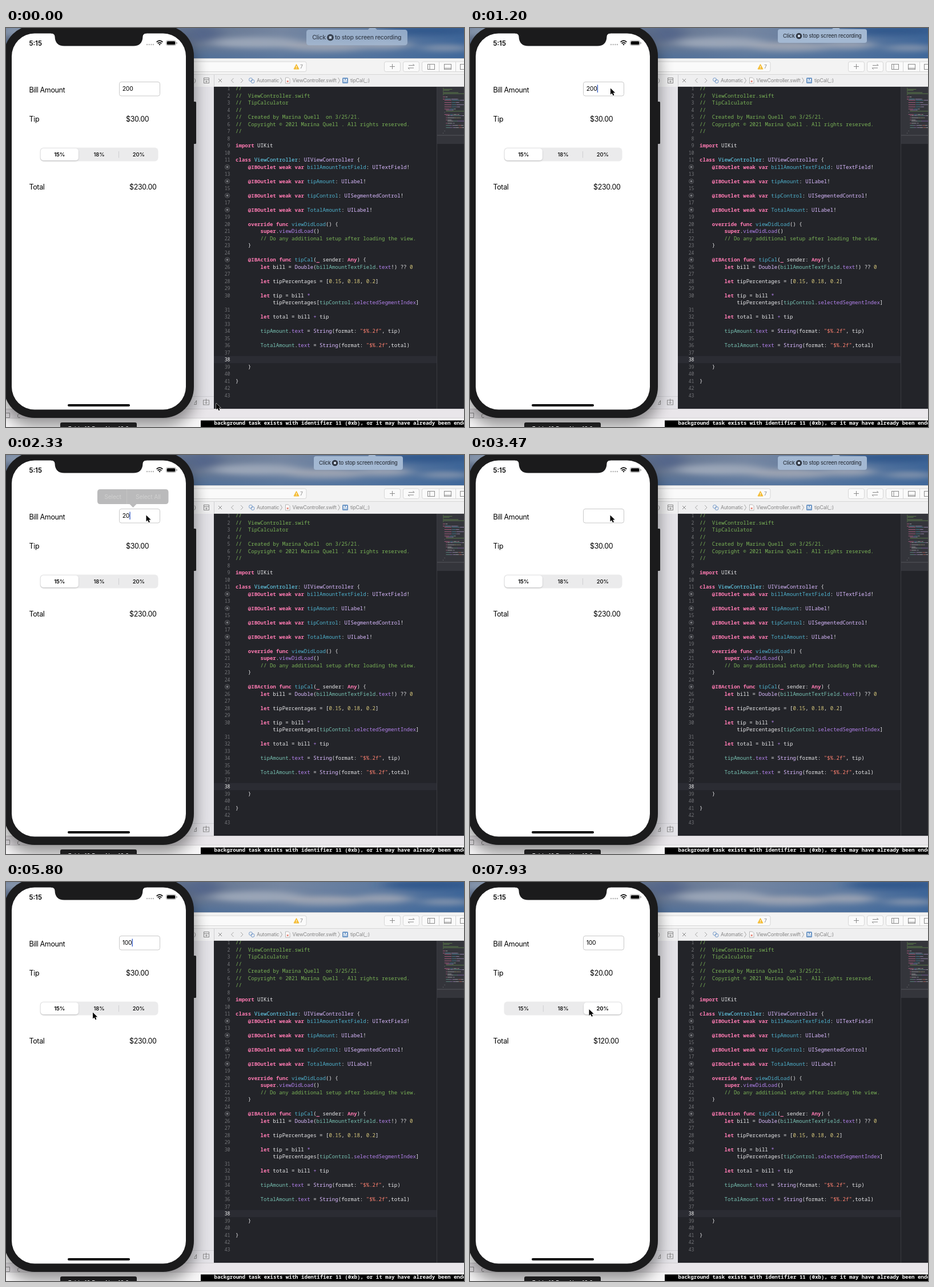
Recreate the animation shown at these times as an HTML page. Size 802 px wide and 699 px high, loop 8 s.

```html
<!DOCTYPE html>
<html lang="en">
<head>
<meta charset="utf-8">
<title>Tip calculator demo</title>
<style>
html, body { margin: 0; width: 100%; height: 100%; overflow: hidden; background: #fff; }
svg { display: block; width: 802px; height: 699px; }
text { white-space: pre; font-family: Inter, "Liberation Sans", sans-serif; }
.mono { font-family: "Noto Sans Mono", "DejaVu Sans Mono", monospace; font-size: 9.08px; font-weight: 500; }
.label { font-size: 12.4px; letter-spacing: -.3px; }
.small { font-size: 10.4px; letter-spacing: -.2px; }
.seg { font-size: 9.5px; text-anchor: middle; letter-spacing: -.1px; }
.crumb { font-size: 8.6px; letter-spacing: -.2px; fill: #858585; }
.pop { font-size: 9.2px; letter-spacing: -.2px; fill: #2f3641; font-weight: 500; }
.line { fill: none; stroke: #8a8a8a; stroke-width: 1; }
</style>
</head>
<body>
<svg viewBox="0 0 802 699">
  <defs>
    <linearGradient id="sky">
      <stop offset=".4" stop-color="#64748f"/><stop offset=".6" stop-color="#7586a1"/>
      <stop offset=".8" stop-color="#5f7a9f"/><stop offset="1" stop-color="#3d6598"/>
    </linearGradient>
    <linearGradient id="haze" x2="0" y2="1">
      <stop offset=".55" stop-color="#416a9c" stop-opacity="0"/><stop offset="1" stop-color="#416a9c" stop-opacity=".6"/>
    </linearGradient>
    <filter id="soft" x="-50%" y="-80%" width="200%" height="260%"><feGaussianBlur stdDeviation="14 5"/></filter>
    <filter id="shade" x="-20%" y="-20%" width="140%" height="140%"><feGaussianBlur stdDeviation="13"/></filter>
    <filter id="lift" x="-20%" y="-30%" width="140%" height="180%"><feDropShadow dx="0" dy="1" stdDeviation="1.2" flood-opacity=".22"/></filter>
    <clipPath id="skyClip"><rect width="802" height="54"/></clipPath>
    <clipPath id="editorClip"><rect x="364" y="103" width="438" height="564"/></clipPath>
  </defs>

  <!-- wallpaper -->
  <g clip-path="url(#skyClip)">
    <rect width="802" height="54" fill="url(#sky)"/>
    <g id="clouds" filter="url(#soft)"></g>
    <rect width="802" height="54" fill="url(#haze)"/>
  </g>

  <!-- editor window -->
  <rect y="53.5" width="802" height="146" fill="#f3f3f3"/>
  <path d="M0 53.5H802" stroke="#c9ccd1"/>
  <rect x="300" y="59" width="226" height="17.5" rx="3" fill="#fafafa" stroke="#d6d6d6"/>
  <path d="M508.500 63.500L513 72H504Z" fill="#f5bd37" stroke="#f5bd37" stroke-linejoin="round"/>
  <path d="M508.500 66.500V69.200M508.500 70.200V71.200" stroke="#fff"/>
  <text class="crumb" x="515" y="71">7</text>
  <g fill="#fafafa" stroke="#d6d6d6">
    <rect x="662.500" y="59" width="28" height="17.500" rx="3"/>
    <rect x="695.500" y="59" width="28" height="17.500" rx="3"/>
    <rect x="728.500" y="59" width="90" height="17.500" rx="3"/>
    <path d="M758.500 59V76.500M787.500 59V76.500"/>
  </g>
  <g class="line">
    <path d="M672 67.500H681M676.500 63V72"/>
    <path d="M705 65.500H715L712.500 63M714 70H704L706.500 72.500"/>
    <rect x="738.500" y="63.500" width="12" height="9"/><path d="M742 63.500V72.500"/>
    <rect x="767.500" y="63.500" width="12" height="9"/><path d="M767.500 70.500H779.500"/>
    <rect x="795.500" y="63.500" width="12" height="9"/>
  </g>
  <rect y="81" width="802" height="22" fill="#efeff0"/>
  <path d="M0 81.500H802M364 102.500H802" stroke="#d6d6d7"/>
  <rect x="300" y="103" width="64" height="564" fill="#e3e2e7"/>
  <path d="M300 645.500H364" stroke="#cfcfd4"/>
  <path d="M364.500 82V103" stroke="#cfcfd2"/>
  <g class="line">
    <path d="M330 88.500Q333.500 92 330 96.500"/>
    <rect x="346.500" y="87.500" width="9" height="9"/><path d="M346.500 90.500H355.500M351 92V95.500M349.200 93.700H352.800"/>
    <path d="M329 659.500H333.500V652.500L330 658"/>
    <rect x="345.500" y="652" width="10" height="8"/><path d="M350.500 649.500V658M348 655.500L350.500 658L353 655.500"/>
    <path d="M372 89L378 95M378 89L372 95"/>
    <path d="M398.500 88L394.500 92L398.500 96M411 88L415 92L411 96" stroke="#a5a5a5"/>
    <path d="M480.500 87L483.500 92L480.500 97M581.500 87L584.500 92L581.500 97" stroke="#a5a5a5"/>
    <g stroke="#6f97c9"><circle cx="428.500" cy="90.500" r="3"/><circle cx="432" cy="93.500" r="3"/></g>
    <path d="M489.500 87H494.500L497 89.500V97H489.500Z" stroke="#b5b5b5" fill="#fff"/>
  </g>
  <rect x="491.700" y="92" width="3" height="3" fill="#e58a7d"/>
  <rect x="589" y="87" width="10" height="10" rx="1.500" fill="#6c96c6"/>
  <text x="594" y="95" font-size="7.5" font-weight="700" fill="#fff" text-anchor="middle">M</text>
  <text class="crumb" x="439" y="95">Automatic</text>
  <text class="crumb" x="501.500" y="95">ViewController.swift</text>
  <text class="crumb" x="603" y="95">tipCal(_:)</text>

  <g clip-path="url(#editorClip)">
    <rect x="364" y="103" width="438" height="564" fill="#232429"/>
    <rect x="364" y="574.700" width="390" height="12.500" fill="#2b2c33"/>
    <path d="M754.500 103V667" stroke="#393a40"/>
    <rect x="755" y="103" width="47" height="100" fill="#34353b"/>
    <path d="M755 188H802" stroke="#55565d"/>
    <g id="map" opacity=".6"></g>
    <g id="code"></g>
  </g>

  <rect y="667" width="802" height="32" fill="#e9e6ea"/>
  <path d="M0 667.500H802" stroke="#cfcdd0"/>
  <path d="M0 683.500H802" stroke="#d5d3d6"/>
  <rect y="684" width="802" height="15" fill="#f8f7f8"/>
  <rect x="341" y="687.500" width="461" height="11.500" fill="#000"/>
  <text class="mono" x="364.500" y="695" fill="#fff" style="font-weight:700">background task exists with identifier 11 (0xb), or it may have already been ended</text>
  <path class="line" d="M0 674.500H6.500V682.500H0M24.500 676Q20 676 20.500 680T24.500 682M45 682H53"/>

  <!-- phone -->
  <rect x="-6" y="12" width="337" height="686" rx="54" opacity=".4" filter="url(#shade)"/>
  <rect x="324" y="129" width="9" height="74" rx="1.500" fill="#1b1b1c"/>
  <rect x="-4" y="-5" width="333" height="688" rx="54" fill="#1b1b1c"/>
  <rect x="10" y="9.500" width="305" height="659" rx="40" fill="#fff"/>
  <path d="M79 6V9.500Q85 9.500 85.500 15Q86 31.500 102 31.500H223Q239 31.500 239.500 15Q240 9.500 246 9.500V6Z" fill="#1b1b1c"/>
  <text x="40.500" y="30.800" font-size="11.400" font-weight="600">5:15</text>
  <g fill="#b5b5b5">
    <circle cx="247" cy="29" r="1.200"/><circle cx="250.700" cy="29" r="1.200"/>
    <circle cx="254.400" cy="29" r="1.200"/><circle cx="258" cy="29" r="1.200"/>
  </g>
  <g fill="none" stroke="#000" stroke-width="1.700">
    <path d="M263.700 24.600Q269 19.800 274.300 24.600M265.700 27Q269 24.200 272.300 27"/>
  </g>
  <path d="M267.200 28.600Q269 27.200 270.800 28.600L269 30.600Z"/>
  <rect x="280.500" y="22" width="17" height="8.500" rx="2.500" fill="none" stroke="#999" stroke-width=".8"/>
  <rect x="281.700" y="23.200" width="14.600" height="6.100" rx="1.500"/>
  <rect x="298.500" y="24.800" width="1.200" height="3" rx=".6" fill="#888"/>

  <text class="label" x="40.500" y="113">Bill Amount</text>
  <text class="label" x="40.500" y="164">Tip</text>
  <text class="label" x="40.500" y="282.500">Total</text>
  <text class="label" id="tip" x="210" y="164"></text>
  <text class="label" id="total" x="216" y="282.500"></text>
  <rect x="198.500" y="94.500" width="71" height="24.500" rx="3.500" fill="#fff" stroke="#c9c9c9"/>
  <text class="small" id="bill" x="203.700" y="110.400"></text>
  <rect id="caret" y="99.500" width="1.400" height="13.500" fill="#3f63c8"/>

  <rect x="59.500" y="209.500" width="207" height="24" rx="6" fill="#ebebec"/>
  <path id="div0" d="M128.300 216V227.500" stroke="#cfcfd2"/>
  <path id="div1" d="M197.500 216V227.500" stroke="#cfcfd2"/>
  <rect id="thumb" x="60.800" y="211" width="66" height="21" rx="5" fill="#fff" filter="url(#lift)"/>
  <text class="seg" id="seg0" x="93.700" y="225">15%</text>
  <text class="seg" id="seg1" x="163" y="225">18%</text>
  <text class="seg" id="seg2" x="232.200" y="225">20%</text>
  <rect x="108" y="659" width="109" height="4" rx="2"/>

  <g id="menu">
    <path d="M165 60H279.500Q284.500 60 284.500 65V81Q284.500 86 279.500 86H228.500L222.500 92L216.500 86H165Q160 86 160 81V65Q160 60 165 60Z" fill="#1f1f20"/>
    <path d="M211.500 60V86" stroke="#555" stroke-width=".6"/>
    <g id="menuText" class="small" fill="#fff" text-anchor="middle">
      <text x="187" y="76.800">Select</text><text x="249" y="76.800">Select All</text>
    </g>
  </g>

  <rect x="95" y="691" width="134" height="14" rx="3" fill="#1d1d1e"/>
  <text x="162" y="705.500" font-size="10" font-weight="500" fill="#fff" text-anchor="middle">Fable 12 Duo Air – 13.3</text>

  <!-- recording hint -->
  <g id="hint">
    <path d="M634 2L641 -5L648 2Z" fill="#a3b8d2"/>
    <rect x="539" y="2" width="156" height="24" rx="4" fill="#a3b8d2"/>
    <text class="pop" x="548" y="17.200">Click</text>
    <circle cx="576" cy="14" r="5.200" fill="#2f3641"/>
    <rect x="574" y="12" width="4" height="4" fill="#c9d6e6"/>
    <text class="pop" x="583" y="17.200">to stop screen recording</text>
  </g>

  <path id="cursor" d="M0 0V11L2.600 8.700L4.500 12.800L6.400 12L4.600 8H8.200Z" stroke="#fff" stroke-width="1" paint-order="stroke" stroke-linejoin="round"/>
</svg>
<script>
const NS = "http://www.w3.org/2000/svg";
const $ = id => document.getElementById(id);

function add(parent, tag, attrs, text) {
  const node = document.createElementNS(NS, tag);
  for (const key in attrs) node.setAttribute(key, attrs[key]);
  if (text) node.textContent = text;
  parent.appendChild(node);
  return node;
}

// x, y, radius x, radius y, colour
[
  [440, 26, 80, 10, "#9aa5b7"], [560, 34, 70, 9, "#a0a6b3"], [660, 30, 50, 9, "#949fb1"],
  [770, 36, 45, 6, "#8c99ae"], [740, 5, 80, 8, "#31588c"], [345, 10, 30, 14, "#54668a"],
  [20, 6, 30, 10, "#8d9db3"]
].forEach(([cx, cy, rx, ry, fill]) => add($("clouds"), "ellipse", { cx, cy, rx, ry, fill }));

// "~x" switches to colour x
const COLORS = {
  c: "#7ab356", k: "#ff7ab2", w: "#e8e8ea", n: "#6bdfff", t: "#dabaff",
  d: "#4eb0cc", p: "#b281eb", v: "#78c2b3", y: "#d9c97c", s: "#ff8170"
};
const outlet = (name, type) => `    ~k@IBOutlet weak var ~d${name}~w: ~t${type}~w!`;
const CODE = [
  "~c//",
  "~c//  ViewController.swift",
  "~c//  TipCalculator",
  "~c//",
  "~c//  Created by Marina Quell  on 3/25/21.",
  "~c//  Copyright © 2021 Marina Quell . All rights reserved.",
  "~c//", "",
  "~kimport ~wUIKit", "",
  "~kclass ~nViewController~w: ~tUIViewController ~w{",
  outlet("billAmountTextField", "UITextField"), "",
  outlet("tipAmount", "UILabel"), "",
  outlet("tipControl", "UISegmentedControl"), "",
  outlet("TotalAmount", "UILabel"), "",
  "    ~koverride func ~dviewDidLoad~w() {",
  "        ~ksuper~w.~pviewDidLoad~w()",
  "        ~c// Do any additional setup after loading the view.",
  "    ~w}", "",
  "    ~k@IBAction func ~dtipCal~w(~k_ ~wsender: ~kAny~w) {",
  "        ~klet ~wbill = ~tDouble~w(~vbillAmountTextField~w.~ptext~w!) ?? ~y0", "",
  "        ~klet ~wtipPercentages = [~y0.15~w, ~y0.18~w, ~y0.2~w]", "",
  "        ~klet ~wtip = bill ~p*",
  "            ~wtipPercentages[~vtipControl~w.~pselectedSegmentIndex~w]", "",
  "        ~klet ~wtotal = bill ~p+ ~wtip", "",
  "        ~vtipAmount~w.~ptext ~w= ~tString~w(format: ~s\"$%.2f\"~w, tip)", "",
  "        ~vTotalAmount~w.~ptext ~w= ~tString~w(format: ~s\"$%.2f\"~w,total)", "",
  "",
  "    ~w}", "",
  "~w}", "", ""
];
const WRAPPED_ROW = 30, CURRENT_LINE = 38, OUTLET_LINES = [12, 14, 16, 18, 25];
const CHAR = 5.446;

CODE.forEach((source, row) => {
  const y = 106 + 12.5 * row;
  const line = row < WRAPPED_ROW ? row + 1 : row;
  if (OUTLET_LINES.includes(line)) {
    add($("code"), "circle", { cx: 387.5, cy: y, r: 4, fill: "none", stroke: "#67686d", "stroke-width": .9 });
    add($("code"), "circle", { cx: 387.5, cy: y, r: 2, fill: "#77787d" });
  } else if (row !== WRAPPED_ROW) {
    add($("code"), "text", {
      x: 392.5, y: y + 3, class: "mono", "text-anchor": "end",
      fill: line === CURRENT_LINE ? "#fff" : "#747579", style: "font-size:8.2px"
    }, String(line));
  }
  let col = 0;
  source.split("~").forEach((part, i) => {
    const body = i ? part.slice(1) : part;
    const fill = COLORS[part[0]];
    if (i && body) {
      add($("code"), "text", {
        x: 402 + col * CHAR, y: y + 3.1, class: "mono", fill,
        style: part[0] === "k" ? "font-weight:700" : ""
      }, body);
      add($("map"), "rect", { x: 765 + col * .68, y: 105 + row * 1.92, width: body.trim().length * .68, height: .9, fill });
    }
    col += body.length;
  });
});

const LOOP = 8000;
const clamp = v => Math.max(0, Math.min(1, v));
const ramp = (t, from, to) => clamp((t - from) / (to - from));
const ease = v => v * v * (3 - 2 * v);
const stepAt = (t, steps) => steps.filter(s => s[0] <= t).pop()[1];

const PATH = [
  [0, 368, 657.5], [70, 368, 657.5], [930, 246, 105.5], [1730, 246, 105.5], [1870, 245.5, 105.5],
  [5330, 245.5, 105.5], [5800, 152, 228.5], [6070, 160, 228], [6330, 172.5, 225.5],
  [7200, 172.5, 225.5], [7530, 208.5, 223], [LOOP, 208.5, 223]
];
const BILL = [[0, "200"], [2270, "20"], [2400, "2"], [2730, ""], [3870, "1"], [4070, "10"], [4270, "100"]];
const PICK_18 = 6400, PICK_20 = 7530;

function cursorAt(t) {
  const i = PATH.findIndex(p => p[0] > t);
  const [t0, x0, y0] = PATH[i - 1], [t1, x1, y1] = PATH[i];
  const k = ease(ramp(t, t0, t1));
  return [x0 + (x1 - x0) * k, y0 + (y1 - y0) * k];
}

// Blinking restarts with each edit.
function caretAt(t) {
  if (t < 1000) return 0;
  if (t < BILL[1][0]) return 1;
  const start = stepAt(t, BILL.map(b => [b[0], b[0]]));
  const phase = (t - start) % 1000;
  return phase < 800 ? 1 - ramp(phase, 570, 655) : ramp(phase, 930, 1000);
}

function draw(t) {
  const [cx, cy] = cursorAt(t);
  $("cursor").setAttribute("transform", `translate(${cx} ${cy})`);

  const bill = $("bill"), text = stepAt(t, BILL);
  if (bill.textContent !== text) bill.textContent = text;
  $("caret").setAttribute("x", 203.8 + (text ? bill.getComputedTextLength() : 0));
  $("caret").setAttribute("opacity", caretAt(t));

  $("tip").textContent = stepAt(t, [[0, "$30.00"], [PICK_18, "$18.00"], [PICK_20, "$20.00"]]);
  $("total").textContent = stepAt(t, [[0, "$230.00"], [PICK_18, "$118.00"], [PICK_20, "$120.00"]]);

  const first = ease(ramp(t, PICK_18, PICK_18 + 260));
  const second = ease(ramp(t, PICK_20, PICK_20 + 260));
  $("thumb").setAttribute("transform", `translate(${69.2 * (first + second)} 0)`);
  $("div0").setAttribute("opacity", second);
  $("div1").setAttribute("opacity", 1 - first);
  const picked = (t >= PICK_18) + (t >= PICK_20);
  for (let i = 0; i < 3; i++) $("seg" + i).setAttribute("font-weight", i === picked ? 600 : 500);

  const menu = ramp(t, 1730, 1900) * (1 - ramp(t, 2240, 2370));
  $("menu").setAttribute("opacity", menu);
  $("menuText").setAttribute("opacity", menu);

  const settle = ease(ramp(t, 0, 270));
  const scale = 1.134 - .134 * settle;
  $("hint").setAttribute("transform", `translate(636 -5.5) scale(${scale}) translate(-636 5.5)`);
  $("hint").setAttribute("opacity", (.85 + .15 * settle) * (1 - ramp(t, 4680, 4980)));
}

function frame(now) {
  draw(now % LOOP);
  requestAnimationFrame(frame);
}
draw(0);
requestAnimationFrame(frame);
</script>
</body>
</html>
```
